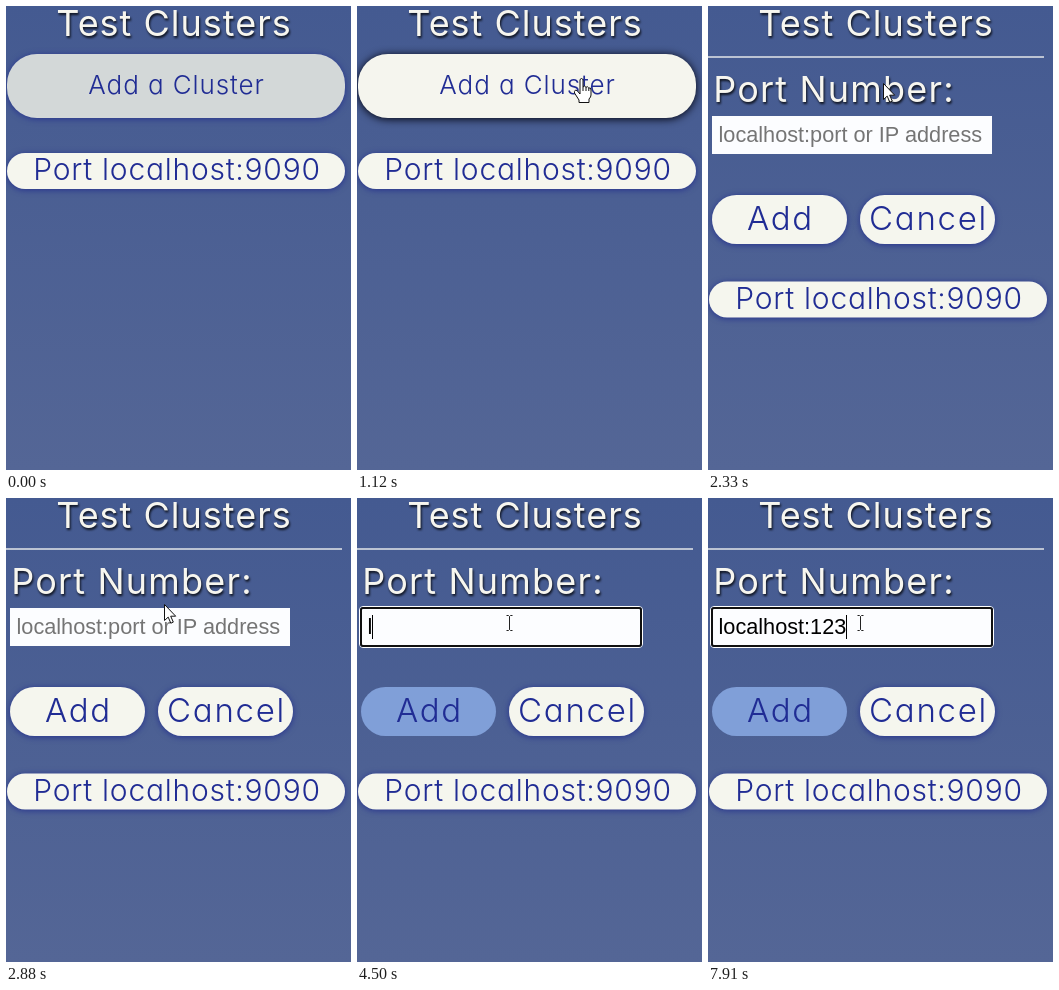
Write an HTML page that moves like this. It is 345 px wide and 464 px high and loops after 8000 ms.

```html
<!DOCTYPE html>
<html lang="en">
<head>
<meta charset="utf-8">
<title>Test Clusters</title>
<style>
  html, body { margin: 0; width: 100%; height: 100%; overflow: hidden; background: #4c6094; }
  svg { display: block; width: 345px; height: 464px; }
  text { font-family: Inter, Lato, sans-serif; font-feature-settings: "cv11"; white-space: pre; }
  .centre { text-anchor: middle; }
  .head { font-size: 36px; fill: #f7f6ef; filter: drop-shadow(1px 2px 1px rgba(0, 0, 0, .8)); }
  .title { letter-spacing: 1px; }
  .label { letter-spacing: 1.2px; }
  .ink { fill: #202c94; font-weight: 350; }
  .port { font-size: 30px; letter-spacing: .75px; }
  .action { font-size: 33px; letter-spacing: 1.7px; }
  .pill { fill: #f5f6ee; filter: drop-shadow(0 1px 3px rgba(28, 38, 140, .8)); }
  .field { font: 21.7px "Liberation Sans", Arial, sans-serif; }
  .hand, .arrow { fill: #fff; stroke: #111; stroke-linejoin: round; }
</style>
</head>
<body>
<svg viewBox="0 0 345 464">
  <defs>
    <linearGradient id="sky" x2="0" y2="1">
      <stop stop-color="#445a91"/>
      <stop offset="1" stop-color="#546696"/>
    </linearGradient>
  </defs>
  <rect width="345" height="464" fill="url(#sky)"/>
  <text class="head title centre" x="168" y="30">Test Clusters</text>

  <g id="menu">
    <rect id="opener" x="1" y="48" width="338" height="64" rx="30"/>
    <text class="ink centre" x="170.5" y="88" font-size="26" letter-spacing=".9">Add a Cluster</text>
  </g>

  <g id="form">
    <path d="M0 51H336" stroke="#e3e6e9" stroke-width="1.6"/>
    <text class="head label centre" x="126" y="96">Port Number:</text>
    <rect x="4" y="110" width="280" height="38" fill="#fcfdff"/>
    <g id="ring" fill="none">
      <rect x="2.5" y="108.5" width="283" height="41" rx="3.5" stroke="#fff"/>
      <rect x="4" y="110" width="280" height="38" rx="2" stroke="#101010" stroke-width="2"/>
    </g>
    <text id="hint" class="field" x="10.5" y="136" fill="#757575">localhost:port or IP address</text>
    <text id="typed" class="field" x="10.5" y="136" fill="#000"></text>
    <rect id="caret" y="117" width="1" height="24"/>
    <rect id="add" class="pill" x="4" y="189" width="135" height="49" rx="24.5"/>
    <text class="ink action centre" x="72.5" y="224">Add</text>
    <rect class="pill" x="152" y="189" width="135" height="49" rx="24.5"/>
    <text class="ink action centre" x="220.5" y="224">Cancel</text>
  </g>

  <g id="port">
    <rect class="pill" x="1" y="147" width="338" height="36" rx="18"/>
    <text class="ink port centre" x="171" y="174">Port localhost:9090</text>
  </g>

  <g id="pointer">
    <path id="hand" class="hand" d="M-2 1.5Q-.5-.5 1 1.5V9Q2.5 7 4 9.3Q5.5 7.8 6.8 10Q9 9 9 12V17Q9 19 7 21V24.5H-3V22L-7.5 15Q-8 11.5-5 12.5L-2 16ZM1 9V13M4 9.3V13M6.8 10V13"/>
    <path id="arrow" class="arrow" d="M.5.5V16.5L4.2 13.1L6.8 19.2L9.3 18.1L6.7 12.2H11.7Z"/>
    <path id="beam" d="M-3-7.5H-1L0-6.5L1-7.5H3M0-6.5V6.5M-3 7.5H-1L0 6.5L1 7.5H3" fill="none" stroke="#222"/>
  </g>
</svg>
<script>
const LOOP = 8000, ENTER = 780, OPEN = 2330, FOCUS = 3690, INPUT_TOP = 110;
const phrase = "localhost:123";
const keys = [4500, 4690, 4840, 5090, 5220, 5510, 5740, 5840, 6070, 6430, 6840, 6880, 7910];
// time, x, y of the pointer's hot spot
const path = [
  [780, 338, 88], [950, 278, 77], [1120, 225, 72], [1300, 201, 74], [1500, 191, 76],
  [1600, 191, 76], [1720, 176.5, 76.5], [2330, 176.5, 76.5], [2331, 175, 77],
  [2660, 175, 77], [2880, 158, 106], [3080, 154, 118], [3380, 152.5, 125]
];
// time, opener brightness from resting to hovered
const glow = [[780, 0], [1100, 1], [2210, 1], [2310, .6]];

const el = {};
document.querySelectorAll("[id]").forEach(e => el[e.id] = e);
const show = (e, on) => e.style.display = on ? "" : "none";
const mix = (a, b, k) => a + (b - a) * k;

function track(rows, t) {
  if (t <= rows[0][0]) return rows[0].slice(1);
  for (let i = 1; i < rows.length; i++) {
    const [from, to] = [rows[i - 1], rows[i]];
    if (t < to[0]) {
      const k = (t - from[0]) / (to[0] - from[0]);
      return from.slice(1).map((v, j) => mix(v, to[j + 1], k));
    }
  }
  return rows[rows.length - 1].slice(1);
}

function drawOpener(t) {
  const [k] = track(glow, t);
  const rgb = [[211, 245], [216, 245], [216, 238]].map(([a, b]) => Math.round(mix(a, b, k)));
  const dark = t < ENTER ? 0 : Math.min(1, (t - ENTER) / 320);
  el.opener.style.fill = `rgb(${rgb})`;
  el.opener.style.filter = `drop-shadow(0 1px ${mix(3, 4, dark)}px ` +
    `rgba(${mix(28, 0, dark)}, ${mix(38, 0, dark)}, ${mix(140, 10, dark)}, ${mix(.75, 1, dark)}))`;
}

function drawField(t) {
  const count = keys.filter(k => k <= t).length;
  const last = count ? keys[count - 1] : FOCUS;
  el.typed.textContent = phrase.slice(0, count);
  show(el.hint, !count);
  show(el.ring, t >= FOCUS);
  show(el.caret, t >= FOCUS && (t - last) % 1000 < 500);
  el.caret.setAttribute("x", Math.round(10.5 + (count ? el.typed.getComputedTextLength() : 0)));
  el.add.style.fill = count ? "#809fd8" : "";
  el.add.style.filter = count ? "none" : "";
}

function drawPointer(t, open) {
  const [x, y] = track(path, t);
  const inField = open && y >= INPUT_TOP;
  show(el.pointer, t >= ENTER);
  show(el.hand, !open);
  show(el.arrow, open && !inField);
  show(el.beam, inField);
  el.pointer.setAttribute("transform", `translate(${Math.round(x * 2) / 2} ${Math.round(y * 2) / 2})`);
}

function draw(t) {
  const open = t >= OPEN;
  show(el.menu, !open);
  show(el.form, open);
  el.port.setAttribute("transform", `translate(0 ${open ? 128.5 : 0})`);
  if (open) drawField(t);
  else drawOpener(t);
  drawPointer(t, open);
}

const start = performance.now();
function tick() {
  draw((performance.now() - start) % LOOP);
  requestAnimationFrame(tick);
}
tick();
</script>
</body>
</html>
```
